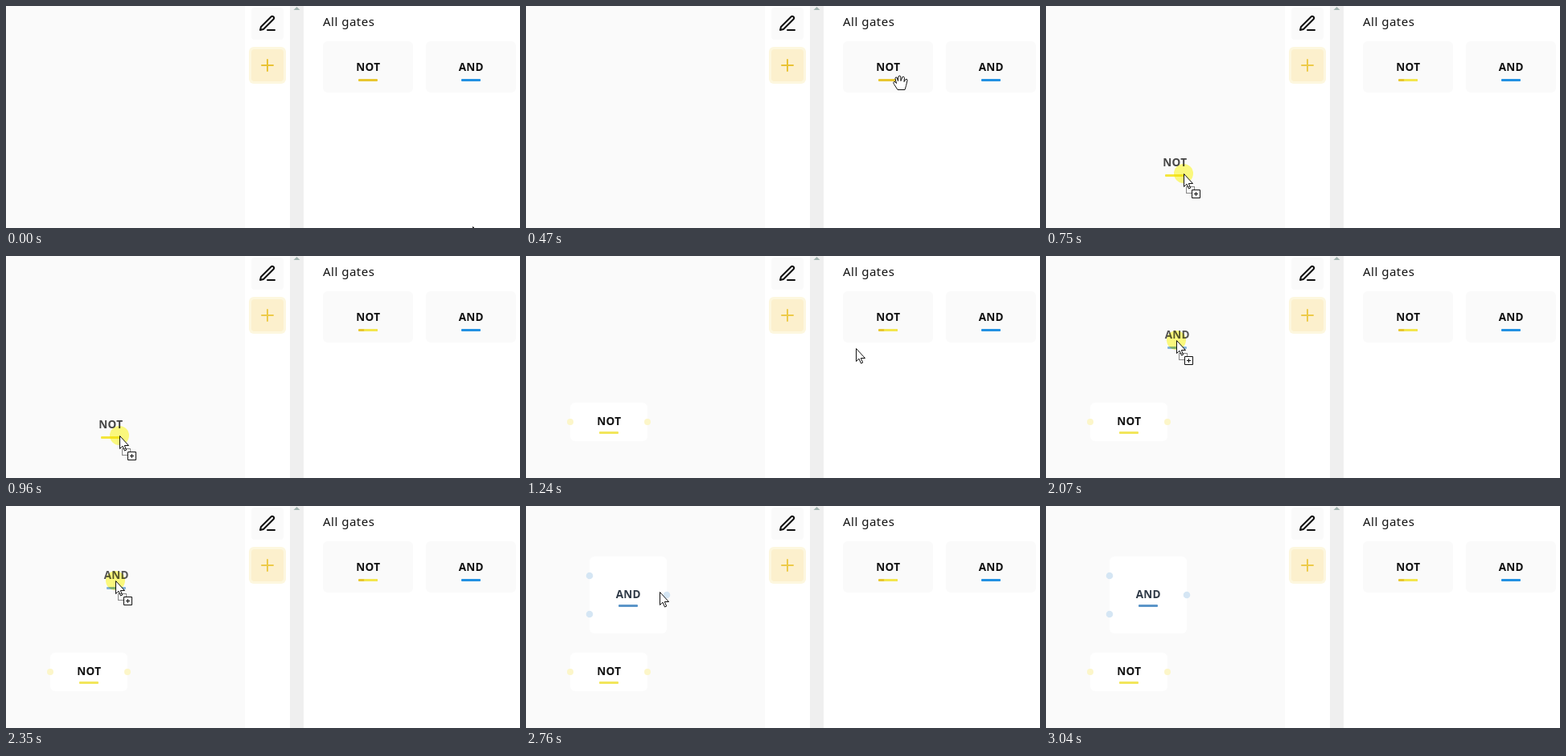
Recreate the animation shown at these times as an HTML page with a canvas. Size 639x277 px, loop 3510 ms.

```html
<!DOCTYPE html>
<html lang="en">
<head>
<meta charset="utf-8">
<title>Logic gates</title>
<style>
  html, body { margin: 0; width: 100%; height: 100%; overflow: hidden; background: #fff; }
  canvas { display: block; width: 639px; height: 277px; }
</style>
</head>
<body>
<canvas id="stage"></canvas>
<script>
const W = 639, H = 277, LOOP = 3510, LAST = 44;
const canvas = document.getElementById('stage');
const ctx = canvas.getContext('2d');
const dpr = window.devicePixelRatio || 1;
canvas.width = W * dpr;
canvas.height = H * dpr;

const FONT = '"Noto Sans", "Open Sans", sans-serif';
const YELLOW = '#e8c630', BRIGHT = '#f3e64e', BLUE = '#2391e2';

// Moments of the story, counted in ticks
const PRESS_NOT = 8, DROP_NOT = 16, PRESS_AND = 26, DROP_AND = 36;

// Pointer path: tick, x, y
const path = [
  [0, 580, 275], [1, 566, 240], [2, 546, 202], [4, 498, 132], [6, 465, 95], [8, 461, 90],
  [9, 438, 99], [10, 305, 152], [11, 171, 209], [12, 151, 219], [13, 142, 223], [15, 139, 224], [16, 139, 224],
  [17, 278, 168], [18, 410, 115], [19, 512, 82], [20, 580, 67], [21, 614, 64], [22, 629, 64], [24, 610, 66],
  [25, 579, 79], [26, 577, 83], [27, 500, 88], [28, 348, 96], [29, 212, 102], [30, 162, 105], [32, 162, 105],
  [33, 149, 98], [34, 136, 93], [39, 136, 93], [40, 166, 107], [41, 270, 152], [42, 388, 198], [43, 491, 225], [44, 491, 225]
];

// The picture advances in steps of 70 ms, four of them 10 ms shorter
const tickTime = n => 70 * n - 10 * [4, 8, 22, 36].filter(k => n >= k).length;

function tickAt(t) {
  let n = LAST;
  while (n > 0 && tickTime(n) > t) n--;
  return n;
}

function pointerAt(n) {
  const i = Math.max(1, path.findIndex(p => p[0] >= n));
  const [n0, x0, y0] = path[i - 1], [n1, x1, y1] = path[i];
  const k = (n - n0) / (n1 - n0);
  return [Math.round(x0 + (x1 - x0) * k), Math.round(y0 + (y1 - y0) * k)];
}

function box(x, y, w, h, r, fill) {
  ctx.fillStyle = fill;
  ctx.beginPath();
  ctx.roundRect(x, y, w, h, r);
  ctx.fill();
}

function dot(x, y, r, fill) {
  ctx.fillStyle = fill;
  ctx.beginPath();
  ctx.arc(x, y, r, 0, Math.PI * 2);
  ctx.fill();
}

function label(text, x, y, ink, bar, gap = 10) {
  ctx.font = '600 13.5px ' + FONT;
  ctx.letterSpacing = '0.3px';
  ctx.textAlign = 'center';
  ctx.fillStyle = ink;
  ctx.fillText(text, x + 0.3, y);
  box(x - 12, y + gap, 24, 3, 1, bar);
}

function icon(d, x, y, color) {
  ctx.save();
  ctx.translate(x, y);
  ctx.strokeStyle = color;
  ctx.lineWidth = 2;
  ctx.lineCap = ctx.lineJoin = 'round';
  ctx.stroke(new Path2D(d));
  ctx.restore();
}

function shape(d, x, y) {
  ctx.save();
  ctx.translate(x + 0.5, y + 0.5);
  ctx.lineWidth = 1;
  ctx.lineJoin = 'round';
  ctx.strokeStyle = '#111';
  ctx.fillStyle = '#fff';
  const p = new Path2D(d);
  ctx.fill(p);
  ctx.stroke(p);
  ctx.restore();
}

const arrow = (x, y) => shape('M0 0V16L3.5 12.7L6 18.5L8.2 17.5L5.8 12H11Z', x, y);
const hand = (x, y) => shape('M-3.5 9L-8 2Q-9.5 0-8-1Q-6.5-1.5-5 1L-6.5-5Q-6.5-7-4.5-6.5L-3-2' +
  'L-2.5-7.5Q-1.5-9.5 .2-7.8L.5-2L2.5-7Q4.3-8.2 5-6L4.5-1L6.5-4Q8.8-5 8.5-2.5L7 4L5.5 9Z', x, y);

function copyBadge(x, y) {
  ctx.save();
  ctx.strokeStyle = '#111';
  ctx.lineWidth = 1;
  ctx.setLineDash([1, 1]);
  ctx.strokeRect(x + 3.5, y + 16.5, 10, 8);
  ctx.restore();
  shape('M0 0H10V10H0ZM2.5 5H7.5M5 2.5V7.5', x + 10, y + 20);
}

function drawPanels(n) {
  ctx.fillStyle = '#fff';
  ctx.fillRect(0, 0, W, H);
  ctx.fillStyle = '#fafafa';
  ctx.fillRect(0, 0, 297, H);
  ctx.fillStyle = '#efefef';
  ctx.fillRect(353, 0, 17, H);
  ctx.fillStyle = '#a3b5b1';
  ctx.fill(new Path2D('M357.5 5L361.5 1L365.5 5Z'));

  box(305, 2, 40, 40, 4, '#fafafa');
  icon('M12 20h9M16.5 3.5a2.12 2.12 0 0 1 3 3L7 19l-4 1 1-4Z', 313, 10, '#111');
  box(302, 51, 46, 46, 6, '#fdf7df');
  box(305, 54, 40, 40, 4, '#fcf0cd');
  icon('M12 5v14M5 12h14', 313, 62, n < 9 ? '#e9c335' : '#edcb49');

  ctx.font = '15px ' + FONT;
  ctx.letterSpacing = '0.5px';
  ctx.textAlign = 'left';
  ctx.fillStyle = '#111';
  ctx.fillText('All gates', 394, 25);

  box(394, 44, 112, 64, 6, '#fafafa');
  box(522, 44, 112, 64, 6, '#fafafa');
  label('NOT', 450, 81, '#111', YELLOW);
  if (n >= PRESS_NOT) box(445, 91, 17, 3, 1, BRIGHT);
  label('AND', 578, 81, '#111', BLUE);
}

function drawNodes(n) {
  if (n >= DROP_NOT) {
    box(55, 183, 96, 48, 6, '#fff');
    label('NOT', 103, 211, '#111', '#f2e65c', 8);
    for (const x of [55, 151]) dot(x, 207, 4, '#fcf6c9');
  }
  if (n >= DROP_AND) {
    box(79, 63, 96, 96, 6, '#fff');
    label('AND', 127, 115, '#2f3a47', '#5b95c8', 8);
    for (const [x, y] of [[79, 87], [79, 135], [175, 111]]) dot(x, y, 4.3, '#d5e6f4');
  }
}

function drawPointer(n) {
  if (n >= LAST) return;
  const [x, y] = pointerAt(n);
  const dragNot = n > PRESS_NOT && n < DROP_NOT;
  const dragAnd = n > PRESS_AND && n < DROP_AND;
  const dragging = dragNot || dragAnd;

  if (dragNot) label('NOT', x - 11, y - 9, '#464646', '#f4e63c');
  if (dragAnd) label('AND', x + 1, y - 2, '#555', '#84b4dc');
  if (dragging || n === PRESS_NOT || n === PRESS_AND) {
    ctx.save();
    ctx.globalCompositeOperation = 'multiply';
    dot(x, y, 12, 'rgba(255, 252, 60, 0.65)');
    ctx.restore();
  }

  const overCard = y > 44 && y < 108 && (x > 394 && x < 506 || x > 522 && x < 634);
  if (overCard && !dragging) hand(x, y);
  else arrow(x, y);
  if (dragging) copyBadge(x, y);
}

function frame() {
  const n = tickAt(performance.now() % LOOP);
  ctx.setTransform(dpr, 0, 0, dpr, 0, 0);
  drawPanels(n);
  drawNodes(n);
  drawPointer(n);
  requestAnimationFrame(frame);
}
frame();
</script>
</body>
</html>
```
